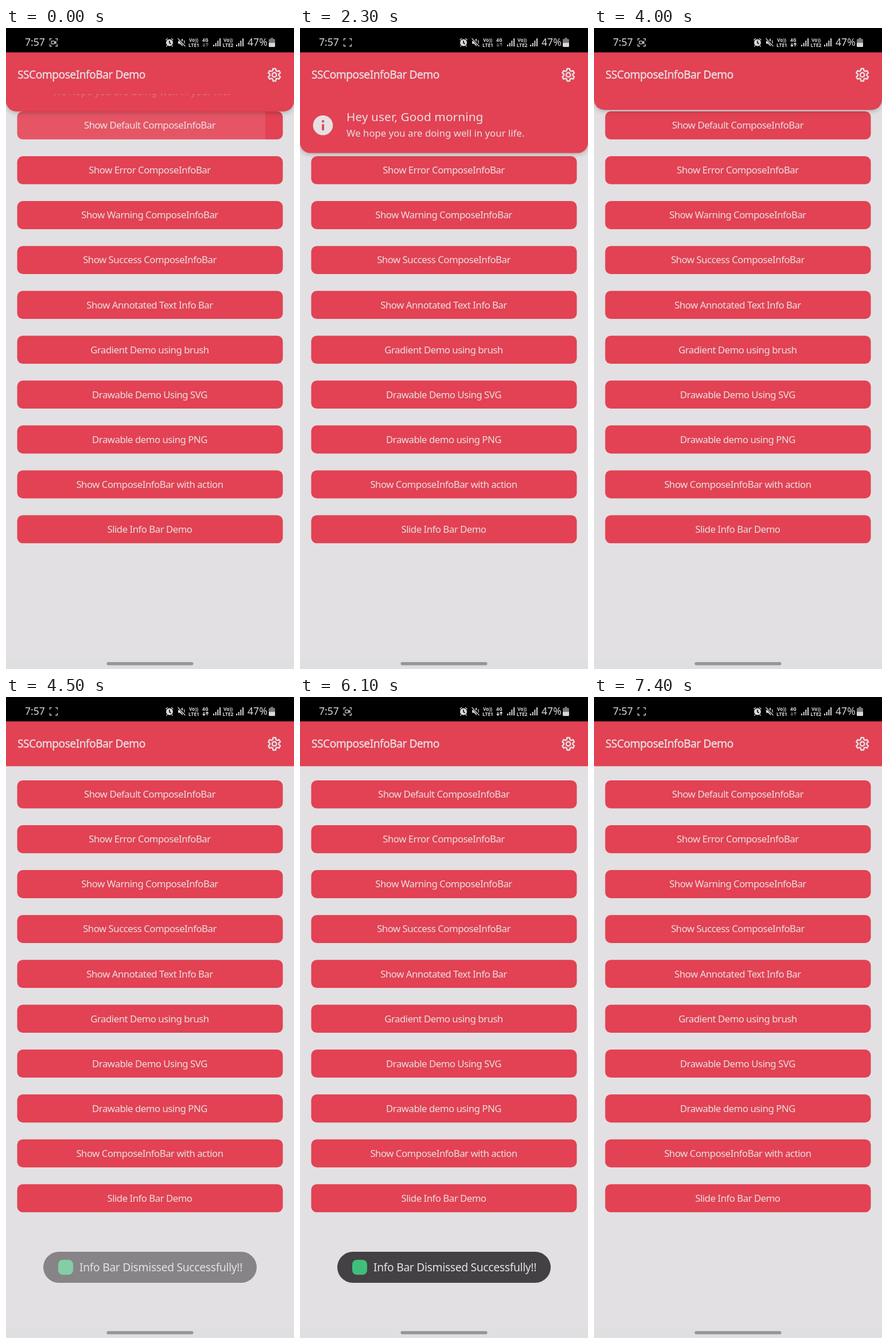
An HTML page for the animation above (7500 ms loop, 502 by 1115 pixels).

```html
<!DOCTYPE html>
<html lang="en">
<head>
<meta charset="utf-8">
<title>Info bar demo</title>
<style>
  html, body { margin: 0; width: 100%; height: 100%; overflow: hidden; background: #e2e0e3; }
  svg { display: block; width: 100%; height: 100%; }
  text { font-family: "Noto Sans", "Open Sans", sans-serif; fill: #e6e0e3; white-space: pre; }
  .red { fill: #e24253; }
  .label { font-size: 16.8px; letter-spacing: -.5px; text-anchor: middle; }
  .title { font-size: 19.2px; letter-spacing: -.5px; stroke: #e6e0e3; stroke-width: .35px; }
  .heading { font-size: 20.8px; letter-spacing: .09px; }
  .detail { font-size: 16.7px; letter-spacing: .04px; }
  .toast { font-size: 19.3px; letter-spacing: -.32px; fill: #e4e2e4; }
  .clock { font-size: 17.6px; fill: #d8d8d8; }
  .tiny { font-size: 8.4px; font-weight: 600; fill: #d8d8d8; }
  .line { fill: none; stroke: #d0d0d0; stroke-width: 1.3; }
  .light { fill: #d8d8d8; }
  #bar { filter: drop-shadow(0 2px 4px rgba(0, 0, 0, .24)); }
</style>
</head>
<body>
<svg viewBox="0 0 502 1115" preserveAspectRatio="none">
  <defs>
    <clipPath id="belowTitle"><rect y="115" width="502" height="110"/></clipPath>
    <g id="signal" class="light">
      <rect y="29" width="2" height="3"/>
      <rect x="3.7" y="26" width="2" height="6"/>
      <rect x="7.4" y="22" width="2" height="10"/>
      <rect x="11.1" y="18" width="2" height="14"/>
    </g>
  </defs>

  <rect width="502" height="1115" fill="#e2e0e3"/>
  <rect y="1097" width="502" height="18" fill="#dfdee0"/>
  <g id="buttons"></g>
  <path id="ripple" fill="#fff" fill-opacity=".1" d="M452 145H29.5a10 10 0 0 0-10 10v29a10 10 0 0 0 10 10H452z"/>

  <rect class="red" y="42" width="502" height="78.4"/>
  <rect id="bar" class="red" y="-80" width="502" height="297.6" rx="18"/>
  <g clip-path="url(#belowTitle)">
    <g id="message">
      <circle cx="40" cy="169.3" r="17.3" fill="#e6e0e3"/>
      <path class="red" d="M38.2 160.5h3.8v3.7h-3.8zM38.2 167.3h3.8v10.6h-3.8z"/>
      <text class="heading" x="81" y="161.5">Hey user, Good morning</text>
      <text class="detail" x="81" y="189.3">We hope you are doing well in your life.</text>
    </g>
  </g>
  <text class="title" x="20" y="87.5">SSComposeInfoBar Demo</text>
  <g fill="none" stroke="#e6e0e3" stroke-width="2.4" stroke-linejoin="round" transform="translate(467.7 81.5)">
    <path id="gear"/>
    <circle r="3.7"/>
  </g>

  <rect width="502" height="42.4"/>
  <text class="clock" x="33" y="31">7:57</text>
  <path class="line" d="M76.5 22v-3.3h3.5M86 18.7h3.5V22M89.5 28v3.5H86M80 31.5h-3.5V28"/>
  <g id="camera" class="line">
    <rect x="79" y="22.7" width="5.5" height="5" rx="1"/>
    <path d="M84.5 25l2.5-1.7v3.8z"/>
  </g>
  <g>
    <circle class="light" cx="285" cy="25.5" r="6"/>
    <path class="line" d="M278.5 21l3.5-3M291.5 21l-3.5-3M281 30.5l-1.5 2M289 30.5l1.5 2"/>
    <path d="M285 22v4l2.5 1.5" fill="none" stroke="#000" stroke-width="1.5"/>
  </g>
  <path class="light" d="M300 22.5h3.5l4.5-4.5v14l-4.5-4.5h-3.5z"/>
  <path class="line" d="M310 21.5q2.5 3.5 0 7"/>
  <path d="M300.5 18l12 14" stroke="#000" stroke-width="3.5"/>
  <path class="line" d="M299.5 18l13 14"/>
  <text class="tiny" x="319" y="24">Vo))</text>
  <text class="tiny" x="318" y="32.5">LTE1</text>
  <text class="tiny" x="342" y="24">4G</text>
  <path id="arrows" fill="none" stroke-width="1.5" d="M345 26v6M342.7 29.5l2.3 2.5 2.3-2.5M350.5 32v-6M348.2 28.5l2.3-2.5 2.3 2.5"/>
  <use href="#signal" x="361"/>
  <text class="tiny" x="379" y="24">Vo))</text>
  <text class="tiny" x="377.5" y="32.5">LTE2</text>
  <use href="#signal" x="401"/>
  <text class="clock" x="421" y="31">47%</text>
  <path fill="#777" d="M461.5 17h4v2h2q1.5 0 1.5 1.5v5h-11v-5q0-1.5 1.5-1.5h2z"/>
  <path class="light" d="M458 25.5h11v6q0 1.5-1.5 1.5h-8q-1.5 0-1.5-1.5z"/>

  <g id="toast">
    <rect x="65" y="965" width="372" height="54" rx="27" fill="#434143"/>
    <rect x="91" y="979" width="26" height="26" rx="8" fill="#3fbf7b"/>
    <text class="toast" x="128" y="999.3">Info Bar Dismissed Successfully!!</text>
  </g>
  <rect x="175.5" y="1103" width="151" height="5.5" rx="2.7" fill="#979598"/>
</svg>
<script>
const LOOP = 7500, FRAME = 100, TRAVEL = 98;
const byId = id => document.getElementById(id);
const clamp = v => Math.min(1, Math.max(0, v));
const between = (t, from, to) => t >= from && t < to;

const labels = [
  'Show Default ComposeInfoBar', 'Show Error ComposeInfoBar',
  'Show Warning ComposeInfoBar', 'Show Success ComposeInfoBar',
  'Show Annotated Text Info Bar', 'Gradient Demo using brush',
  'Drawable Demo Using SVG', 'Drawable demo using PNG',
  'Show ComposeInfoBar with action', 'Slide Info Bar Demo'
];
byId('buttons').innerHTML = labels.map((label, i) => {
  const y = 145 + i * 78.05;
  return `<rect class="red" x="19.5" y="${y}" width="463" height="48.8" rx="9.8"/>
    <text class="label" x="250.5" y="${y + 30.3}">${label}</text>`;
}).join('');

// Six teeth, each from root to tip and back.
const tooth = [[-21, 7.9], [-12, 11], [12, 11], [21, 7.9]];
const gearPoints = [];
for (let i = 0; i < 6; i++) {
  for (const [offset, radius] of tooth) {
    const angle = (i * 60 - 90 + offset) * Math.PI / 180;
    gearPoints.push([Math.cos(angle) * radius, Math.sin(angle) * radius]);
  }
}
byId('gear').setAttribute('d', `M${gearPoints.join('L')}Z`);

// cubic-bezier(.4, 0, .2, 1)
function ease(x) {
  if (x <= 0 || x >= 1) return clamp(x);
  let low = 0, high = 1, s;
  for (let i = 0; i < 20; i++) {
    s = (low + high) / 2;
    const at = 1.2 * (1 - s) ** 2 * s + 0.6 * (1 - s) * s * s + s ** 3;
    if (at < x) low = s; else high = s;
  }
  return s * s * (3 - 2 * s);
}

const bar = byId('bar'), message = byId('message'), toast = byId('toast');
const camera = byId('camera'), arrows = byId('arrows'), ripple = byId('ripple');
const dataActive = [[200, 1100], [1900, 2100], [2900, 3100], [3900, 5100], [5900, 7100]];

function draw(t) {
  const open = ease((t + 78) / 300) - ease((t - 3852) / 300);
  const shift = `translate(0 ${(open - 1) * TRAVEL})`;
  bar.setAttribute('transform', shift);
  bar.style.display = open > .005 ? '' : 'none';
  message.setAttribute('transform', shift);
  message.style.opacity = clamp((open - .23) * 10);
  ripple.style.opacity = clamp(1 - t / 300);
  toast.style.opacity = Math.min(clamp((t - 4300) / 350), clamp((7050 - t) / 500));
  camera.style.opacity = (t + 200) % 1000 < 500 ? 1 : 0;
  const active = dataActive.some(([from, to]) => between(t, from, to));
  arrows.setAttribute('stroke', active ? '#d8d8d8' : '#606060');
}

const start = performance.now();
function tick() {
  const t = (performance.now() - start) % LOOP;
  draw(Math.floor(t / FRAME) * FRAME);
  requestAnimationFrame(tick);
}
tick();
</script>
</body>
</html>
```
